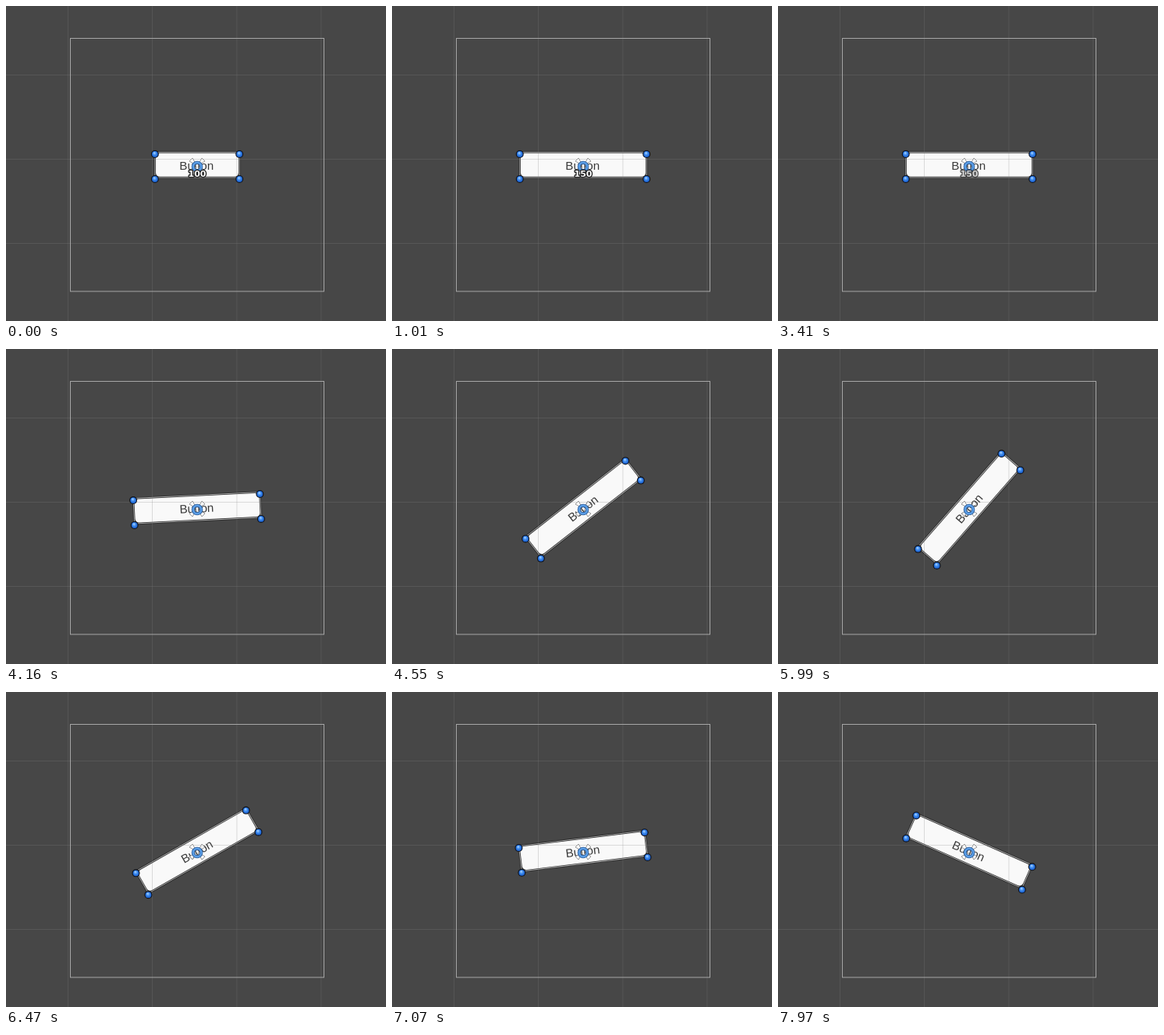
Write an HTML page with a canvas that moves like this. It is 487 px wide and 404 px high and loops after 8000 ms.

```html
<!DOCTYPE html>
<html lang="en">
<head>
<meta charset="utf-8">
<title>Button resize and rotate</title>
<style>
  html, body { margin: 0; width: 100%; height: 100%; overflow: hidden; background: #474747; }
  canvas { display: block; width: 487px; height: 404px; }
</style>
</head>
<body>
<canvas id="stage"></canvas>
<script>
const W = 487, H = 404, LOOP = 8000, STEP = 30, DRAG_START = 3410;
const SCALE = 1.083;
const CENTER = { x: 245, y: 203.8 };
const GIZMO = { x: 245, y: 206 };
const RECT_H = 30 * SCALE;

// The width field is typed in: 100, then 1, 15, 150.
const WIDTHS = [[0, 100], [500, 1], [770, 15], [1010, 150]];

// Rotation drag: time in ms, counter-clockwise degrees.
const ANGLES = [
  [3900, 0], [4100, 1.2], [4190, 4.2], [4550, 38], [4820, 58], [5000, 64],
  [5120, 65.2], [5360, 63.6], [5600, 63.6], [5750, 60], [6050, 46],
  [6410, 31], [6470, 29.7], [6780, 17], [7070, 7], [7160, 6.5],
  [7280, 7.4], [7520, 7.4], [7640, 1], [7970, -23.9]
];

const canvas = document.getElementById("stage");
const ctx = canvas.getContext("2d");
const dpr = window.devicePixelRatio || 1;
canvas.width = Math.round(W * dpr);
canvas.height = Math.round(H * dpr);

const clamp = (v, lo, hi) => Math.min(hi, Math.max(lo, v));

function widthAt(t) {
  return WIDTHS.filter(([start]) => start <= t).pop()[1];
}

// Slope at a key, zero at turning points so that nothing overshoots.
function slope(keys, i) {
  if (i === 0 || i === keys.length - 1) return 0;
  const rate = k => (keys[k + 1][1] - keys[k][1]) / (keys[k + 1][0] - keys[k][0]);
  const a = rate(i - 1), b = rate(i);
  return a * b <= 0 ? 0 : 2 * a * b / (a + b);
}

function angleAt(t) {
  const last = ANGLES.length - 1;
  if (t <= ANGLES[0][0]) return 0;
  if (t >= ANGLES[last][0]) return ANGLES[last][1];
  const i = ANGLES.findIndex(key => key[0] > t) - 1;
  const [t0, a0] = ANGLES[i], [t1, a1] = ANGLES[i + 1];
  const d = t1 - t0, u = (t - t0) / d, u2 = u * u, u3 = u2 * u;
  return (2 * u3 - 3 * u2 + 1) * a0 + (u3 - 2 * u2 + u) * d * slope(ANGLES, i)
    + (3 * u2 - 2 * u3) * a1 + (u3 - u2) * d * slope(ANGLES, i + 1);
}

function disc(x, y, r, fill) {
  ctx.beginPath();
  ctx.arc(x, y, r, 0, Math.PI * 2);
  ctx.fillStyle = fill;
  ctx.fill();
}

function strokeBox(x, y, w, h, color, line) {
  ctx.strokeStyle = color;
  ctx.lineWidth = line;
  ctx.strokeRect(x, y, w, h);
}

function drawGrid() {
  ctx.fillStyle = "rgba(128,128,128,0.26)";
  for (let x = 79; x < W; x += 108) ctx.fillRect(x + (x > 200 ? 0.4 : 0), 0, 1, H);
  for (let y = 88; y < H; y += 108) ctx.fillRect(0, y, W, 1);
}

function drawButton(w, rad) {
  ctx.save();
  ctx.translate(CENTER.x, CENTER.y);
  ctx.rotate(rad);

  const innerW = Math.max(0, w - 2.4), innerH = RECT_H - 2.4;
  strokeBox(-w / 2, -RECT_H / 2, w, RECT_H, "rgba(20,20,20,0.5)", 3);
  ctx.beginPath();
  ctx.roundRect(-innerW / 2, -innerH / 2, innerW, innerH, Math.min(5, innerW / 2));
  ctx.fillStyle = "#f9f9f9";
  ctx.fill();
  strokeBox(-w / 2, -RECT_H / 2, w, RECT_H, "rgba(190,190,190,0.85)", 1);

  ctx.font = "15.2px 'Liberation Sans', Arial, sans-serif";
  ctx.textAlign = "center";
  ctx.textBaseline = "alphabetic";
  ctx.fillStyle = "#3a3a3a";
  let text = "Button";
  while (text && ctx.measureText(text).width > w) text = text.slice(0, -1);
  ctx.fillText(text, -0.7, 5.8);
  ctx.restore();
}

function drawAnchors() {
  ctx.save();
  ctx.translate(GIZMO.x, GIZMO.y - 1);
  ctx.lineWidth = 0.8;
  ctx.strokeStyle = "rgba(85,85,85,0.75)";
  ctx.fillStyle = "rgba(255,255,255,0.85)";
  for (let i = 0; i < 4; i++) {
    ctx.beginPath();
    ctx.moveTo(1, 1);
    ctx.lineTo(10, 6);
    ctx.lineTo(6, 10);
    ctx.closePath();
    ctx.fill();
    ctx.stroke();
    ctx.rotate(Math.PI / 2);
  }
  ctx.restore();
}

function drawPivot() {
  const { x, y } = GIZMO;
  ctx.beginPath();
  ctx.arc(x, y, 5.2, 0, Math.PI * 2);
  ctx.strokeStyle = "#2f5f9c";
  ctx.lineWidth = 4.2;
  ctx.stroke();
  ctx.strokeStyle = "#5b9ee6";
  ctx.lineWidth = 2.6;
  ctx.stroke();
}

function drawHandle(x, y) {
  disc(x, y, 5, "#101318");
  const shade = ctx.createRadialGradient(x - 0.8, y - 1.8, 0.3, x, y, 4);
  shade.addColorStop(0, "#a4d0ff");
  shade.addColorStop(0.5, "#3d8bee");
  shade.addColorStop(1, "#1659c8");
  disc(x, y, 3.9, shade);
}

function drawHandles(w, rad) {
  const c = Math.cos(rad), s = Math.sin(rad);
  for (const sx of [-1, 1]) {
    for (const sy of [-1, 1]) {
      const px = sx * w / 2, py = sy * 16;
      drawHandle(GIZMO.x + px * c - py * s, GIZMO.y + px * s + py * c);
    }
  }
}

function drawLabel(text, alpha) {
  if (alpha <= 0) return;
  ctx.save();
  ctx.globalAlpha = alpha;
  ctx.font = "bold 11px 'DejaVu Sans', sans-serif";
  ctx.textAlign = "center";
  ctx.lineJoin = "round";
  ctx.lineWidth = 2.6;
  ctx.strokeStyle = "#1c1c1c";
  ctx.strokeText(text, 245, 218.6);
  ctx.fillStyle = "#fff";
  ctx.fillText(text, 245, 218.6);
  ctx.restore();
}

function draw(time) {
  const t = time < DRAG_START
    ? time
    : DRAG_START + Math.floor((time - DRAG_START) / STEP) * STEP;
  const units = widthAt(t), w = units * SCALE;
  const rad = -angleAt(t) * Math.PI / 180;
  const labelAlpha = t < DRAG_START ? 1 : clamp(0.75 - (t - DRAG_START) / 700, 0, 1);

  ctx.setTransform(dpr, 0, 0, dpr, 0, 0);
  ctx.fillStyle = "#474747";
  ctx.fillRect(0, 0, W, H);
  drawButton(w, rad);
  drawGrid();
  strokeBox(82.5, 41.5, 325, 324.5, "#a6a6a6", 1);
  drawAnchors();
  drawPivot();
  drawLabel(String(units), labelAlpha);
  drawHandles(w, rad);
}

const start = performance.now();
function tick() {
  draw((performance.now() - start) % LOOP);
  requestAnimationFrame(tick);
}
tick();
</script>
</body>
</html>
```
